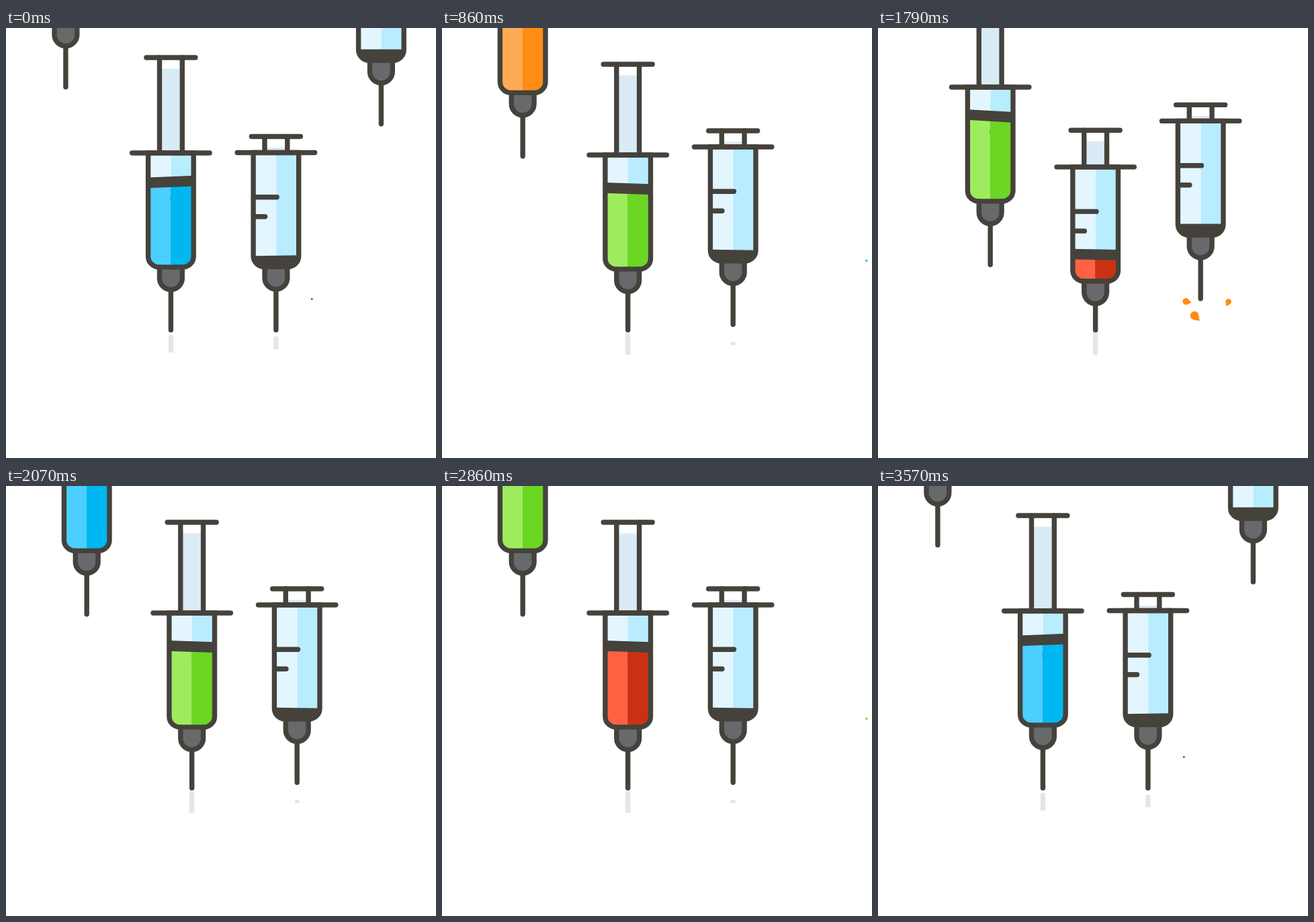
Recreate the animation shown at these times as an HTML page with a canvas. Size 640 by 640 pixels, loop 3640 ms.

```html
<!DOCTYPE html>
<html lang="en">
<head>
<meta charset="utf-8">
<title>Syringes</title>
<style>
  html, body { margin: 0; width: 100%; height: 100%; overflow: hidden; background: #fff; }
  canvas { display: block; }
</style>
</head>
<body>
<canvas id="stage" width="640" height="640"></canvas>
<script>
const ctx = document.getElementById('stage').getContext('2d');
const LOOP = 3640, DARK = '#45423c', STROKE = 7.4;
const STEP = 15.65;      // horizontal travel per tick
const SPACING = 10;      // ticks between two syringes
const LIQUIDS = {
  red: ['#ff6243', '#ca3113'], green: ['#9eec5e', '#6cd624'],
  blue: ['#4ccfff', '#00b7f1'], orange: ['#ffaa55', '#ff8c15']
};
const ORDER = ['red', 'green', 'orange', 'red', 'green', 'blue', 'red', 'green', 'blue'];

// Keyframes as [age, value]; age counts ticks.
const HEIGHT = [[-3, -263], [0, -176.5], [1, -128.5], [2, -73.5], [3, -14.5], [6, 127], [10, 186],
  [11, 186.5], [12, 189], [13, 197], [16, 208], [20, 185.5], [21, 183], [22, 177], [23, 168],
  [26, 110], [30, -121.5], [31, -228.5], [33, -480]];
const PLUNGER = [[9, 142], [10, 142], [11, 140.5], [12, 135], [13, 123], [16, 29], [17, 24.5], [20, 24]];
const TILT = [[3, 12], [6, 0], [8, -4], [10, -2.5], [11, 0], [12, 2], [13, 3], [16, 0], [20, -1], [22, 1], [24, 0]];
const GLINT_TOP = [[8, 462], [9, 459], [20, 459], [21, 461.5], [22, 466.5], [23, 464.5]];
const GLINT_END = [[8, 470], [9, 478], [10, 483], [11, 485], [13, 487], [16, 486], [20, 478], [21, 476], [22, 472], [23, 467]];

// Smooth cubic through the keyframes, clamped at both ends.
function curve(keys, at) {
  const last = keys.length - 1;
  if (at <= keys[0][0]) return keys[0][1];
  if (at >= keys[last][0]) return keys[last][1];
  const gap = i => keys[i + 1][0] - keys[i][0];
  const slope = i => (keys[i + 1][1] - keys[i][1]) / gap(i);
  const tangent = i => i === 0 ? slope(0) : i === last ? slope(last - 1)
    : (gap(i - 1) * slope(i) + gap(i) * slope(i - 1)) / (gap(i - 1) + gap(i));
  const i = keys.findIndex(k => k[0] > at) - 1;
  const h = gap(i), u = (at - keys[i][0]) / h, v = 1 - u;
  return v * v * (1 + 2 * u) * keys[i][1] + u * u * (3 - 2 * u) * keys[i + 1][1]
    + h * u * v * (v * tangent(i) - u * tangent(i + 1));
}

function line(x1, y1, x2, y2) {
  ctx.beginPath();
  ctx.moveTo(x1, y1);
  ctx.lineTo(x2, y2);
  ctx.stroke();
}

function box(color, x, y, w, h) {
  ctx.fillStyle = color;
  ctx.fillRect(x, y, w, h);
}

function band(color, x1, x2, top, bottom, tilt) {
  const lean = x => tilt * x / 61;
  ctx.fillStyle = color;
  ctx.beginPath();
  ctx.moveTo(x1, top + lean(x1));
  ctx.lineTo(x2, top + lean(x2));
  ctx.lineTo(x2, bottom + lean(x2));
  ctx.lineTo(x1, bottom + lean(x1));
  ctx.fill();
}

function barrelPath() {
  ctx.beginPath();
  ctx.roundRect(-33.8, 0, 67.6, 169.9, [0, 0, 16, 16]);
}

function drawSyringe(age, [light, deep]) {
  const y = curve(HEIGHT, age), cap = -curve(PLUNGER, age);
  const stopper = 185 + cap, tilt = curve(TILT, age);
  ctx.save();
  ctx.translate(88.9 + STEP * age, y);
  ctx.strokeStyle = DARK;
  ctx.lineWidth = STROKE;
  ctx.lineCap = 'round';

  box('#d9ebf5', -13.2, cap + 16.5, 26.4, -cap - 16.5);
  line(-16.9, cap, -16.9, 0);
  line(16.9, cap, 16.9, 0);
  line(-36.5, cap, 36.5, cap);

  ctx.save();
  barrelPath();
  ctx.clip();
  box('#e3f6ff', -34, 0, 34.3, 171);
  box('#b8ecff', .3, 0, 34, 171);
  line(-34, 66.3, 1.3, 66.3);
  line(-34, 95.3, -16.3, 95.3);
  band(light, -34, -.6, stopper, 190, tilt);
  band(deep, -.6, 34, stopper, 190, tilt);
  band(DARK, -34, 34, stopper - 7.8, stopper + 7.8, tilt);
  ctx.restore();

  line(0, 205, 0, Math.min(264.3, 449.4 - y));
  ctx.fillStyle = '#67696b';
  ctx.beginPath();
  ctx.moveTo(-16.9, 170);
  ctx.lineTo(-16.9, 186.5);
  ctx.arc(0, 186.5, 16.9, Math.PI, 0, true);
  ctx.lineTo(16.9, 170);
  ctx.fill();
  ctx.stroke();
  barrelPath();
  ctx.stroke();
  line(-57.7, 0, 57.7, 0);
  ctx.restore();
}

function drawGlint(age) {
  if (age < 8 || age > 23) return;
  const x = 88.9 + STEP * age, top = curve(GLINT_TOP, age), end = curve(GLINT_END, age);
  ctx.fillStyle = '#e6e6e6';
  ctx.save();
  ctx.beginPath();
  ctx.rect(x - 4, top, 8, end - top);
  ctx.clip();
  ctx.beginPath();
  ctx.roundRect(x - 3.7, top, 7.4, 40, 3.2);
  ctx.fill();
  ctx.restore();
}

function teardrop(x, y, r, angle) {
  ctx.save();
  ctx.translate(x, y);
  ctx.rotate(angle);
  ctx.beginPath();
  ctx.arc(0, 0, r, 1, -1);
  ctx.lineTo(r * 1.75, 0);
  ctx.fill();
  ctx.restore();
}

// Three drops fly off as the needle leaves the surface.
function drawSplash(age, index, color) {
  const s = age - 22.7;
  if (s < 0) return;
  const brisk = index % 3 === 0 || index === 2;
  const pace = brisk ? 1.2 : 1;
  const drops = [
    { x: 5.5 * s - .64 * s * s, y: -18.6 * s + 1.86 * s * s, r: 6, angle: .2, from: .5, life: 8 },
    { x: 12 * s - 5.6, y: 4.1 - 7 * s, r: 8, angle: .8, from: 0, life: 7 },
    { x: pace * (28.5 * s - .95 * s * s), y: -15.5 * s + .58 * s * s, r: 5.5, angle: 2, from: 0, life: brisk ? 7.2 : 10.5 }
  ];
  ctx.fillStyle = color;
  for (const d of drops) {
    if (s < d.from || s >= d.life) continue;
    const r = d.r * Math.min(1, .6 + s / 4) * (1 - s / d.life) ** .6;
    teardrop(449 + d.x, 440 + d.y, r, d.angle);
  }
}

function draw(now) {
  // Shown at 14 pictures a second, moved at 25 ticks a second.
  const picture = Math.floor((now % LOOP + 5) * .014);
  const tick = Math.floor((picture + .5) / .56);
  box('#fff', 0, 0, 640, 640);
  for (let n = Math.ceil((tick - 34) / SPACING); n * SPACING <= tick + 3; n++) {
    const age = tick - n * SPACING, index = (n + 9) % 9;
    const liquid = LIQUIDS[ORDER[index]];
    drawGlint(age);
    drawSyringe(age, liquid);
    drawSplash(age, index, liquid[1]);
  }
}

const start = performance.now();
function loop() {
  draw(performance.now() - start);
  requestAnimationFrame(loop);
}
loop();
</script>
</body>
</html>
```
